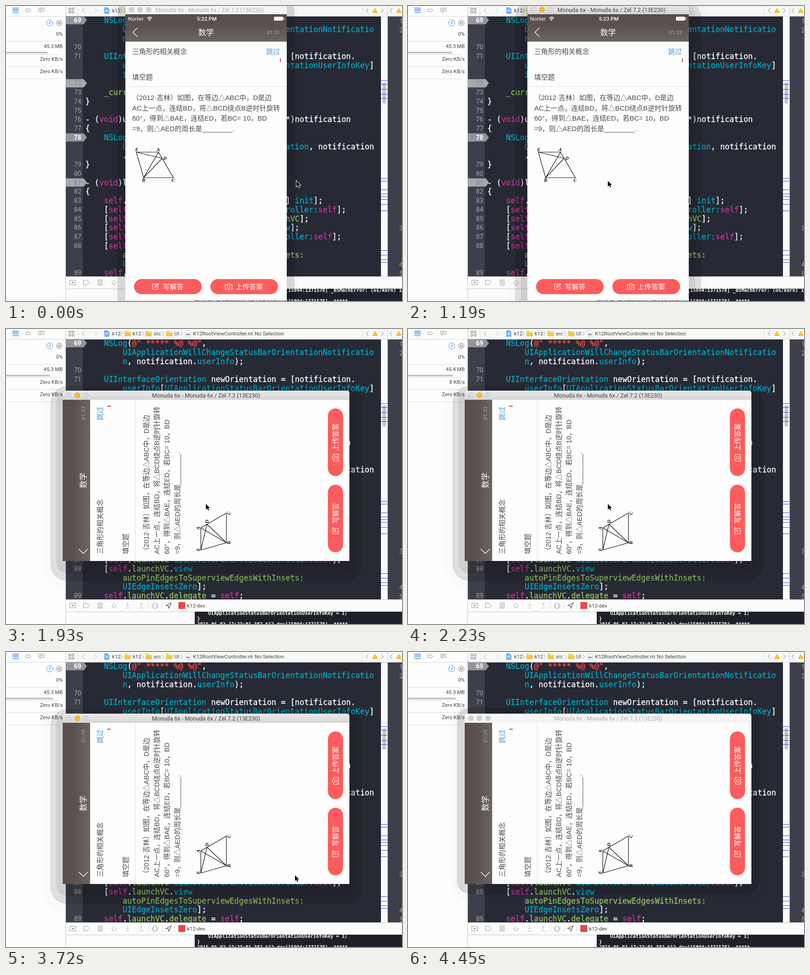
Recreate the animation shown at these times as an HTML page with a canvas. Size 866x646 px, loop 4550 ms.

```html
<!DOCTYPE html>
<html lang="zh-CN">
<head>
<meta charset="utf-8">
<title>Simulator rotation</title>
<style>
html, body { margin: 0; width: 866px; height: 646px; overflow: hidden; background: #fff; }
canvas { display: block; }
</style>
</head>
<body>
<canvas width="866" height="646"></canvas>
<script>
const LOOP = 4550;
const ctx = document.querySelector('canvas').getContext('2d');
const UI = 'Roboto, "Liberation Sans", sans-serif';
const MONO = '"DejaVu Sans Mono", monospace';
const CJK = '"Liberation Sans", "Noto Sans CJK SC", "Noto Sans CJK", sans-serif';
const SERIF = '"Liberation Serif", serif';
const CYAN = '#00a9c4', MAGENTA = '#c8319d', GREEN = '#93c462', RED = '#ff4747';
const BG = '#272a35', GUTTER = '#3d404b', ICON = '#9a9a9a';

// Each schedule lists [start, value]; the last one started is current.
const clock = [[0, '5:22 PM'], [140, '5:23 PM']];
const timer = [[0, '01:31'], [890, '01:32'], [1930, '01:33'], [2830, '01:34'], [3870, '01:35']];
const memory = [[0, '45.3 MB'], [2230, '45.4 MB'], [3120, '45.3 MB']];
const disk = [[0, 'Zero KB/s'], [2080, '8 KB/s'], [3120, 'Zero KB/s']];
const barEnd = [[0, 91], [140, 94], [1190, 96], [2230, 99], [3120, 102], [4170, 104]];
const pointer = [[0, [634, 382]], [140, [408, 398]], [290, [433, 385]], [440, [436, 382]],
  [3720, [631, 488]], [3870, [711, 533]], [4020, null]];
const at = (steps, t) => steps.filter(s => s[0] <= t).pop()[1];

const code = [
  [69, 4, 'NSLog(@" ***** %@ %@",'],
  [0, 8, 'UIApplicationWillChangeStatusBarOrientationNotificatio'],
  [0, 8, 'n, notification.userInfo);'],
  [70, 0, ''],
  [71, 4, 'UIInterfaceOrientation newOrientation = [notification.'],
  [0, 8, 'userInfo[UIApplicationStatusBarOrientationUserInfoKey]'],
  [0, 8, 'integerValue];'],
  [72, 0, ''],
  [73, 4, '_currentOrientation = newOrientation;'],
  [74, 0, '}'],
  [75, 0, ''],
  [76, 0, '- (void)updateOrientations:(NSNotification *)notification'],
  [77, 0, '{'],
  [78, 4, 'NSLog(@" ***** %@ %@",'],
  [0, 8, 'UIDeviceOrientationDidChangeNotification, notification'],
  [0, 8, '.userInfo);'],
  [79, 0, '}'],
  [80, 0, ''],
  [81, 0, '- (void)loadLaunchView'],
  [82, 0, '{'],
  [83, 4, 'self.launchVC = [[K12LaunchScreen alloc] init];'],
  [84, 4, '[self.launchVC willMoveToParentViewController:self];'],
  [85, 4, '[self addChildViewController:self.launchVC];'],
  [86, 4, '[self.view addSubview:self.launchVC.view];'],
  [87, 4, '[self.launchVC didMoveToParentViewController:self];'],
  [88, 4, '[self.launchVC.view'],
  [0, 8, 'autoPinEdgesToSuperviewEdgesWithInsets:'],
  [0, 8, 'UIEdgeInsetsZero];'],
  [89, 4, 'self.launchVC.delegate = self;']
];
const rules = [
  [/^@"/, RED],
  [/^(self|void)$/, MAGENTA],
  [/^(launchVC|delegate|autoPin\w+:|_current\w+)$/, GREEN],
  [/^((UI|NS)\w+|n|userInfo|integerValue|alloc|init|view|addSubview:|\w+ViewController:)$/, CYAN]
];

function text(s, x, y, size, color, align = 'left', face = UI, style = '') {
  ctx.font = `${style} ${size}px ${face}`;
  ctx.textAlign = align;
  ctx.fillStyle = color;
  ctx.fillText(s, x, y + size * (face === CJK ? .38 : .36));
}
function rect(x, y, w, h, color) {
  ctx.fillStyle = color;
  ctx.fillRect(x, y, w, h);
}
function round(x, y, w, h, r, color) {
  ctx.beginPath();
  ctx.roundRect(x, y, w, h, r);
  ctx.fillStyle = color;
  ctx.fill();
}
function fill(d, color) {
  ctx.fillStyle = color;
  ctx.fill(new Path2D(d));
}
function line(d, color, width = 1) {
  ctx.strokeStyle = color;
  ctx.lineWidth = width;
  ctx.stroke(new Path2D(d));
}
function circle(x, y, r, color, edge) {
  ctx.beginPath();
  ctx.arc(x, y, r, 0, 7);
  if (color) { ctx.fillStyle = color; ctx.fill(); }
  if (edge) { ctx.strokeStyle = edge; ctx.lineWidth = 1; ctx.stroke(); }
}

function sidebar(t) {
  rect(0, 0, 130, 646, '#fdfdfd');
  rect(130, 0, 1, 646, '#c4c4c4');
  rect(0, 22, 130, 1, '#d4d4d4');
  line('M14 4.5H28M14 7.5H28M14 10.5H28M14 14.5H28', '#4a90e2', 1.5);
  line('M43.5 6.5H51L54.5 9.5 51 12.5H43.5Z', ICON);
  line('M71.5 4.5H83.5V11.5H77L74.5 14.5V11.5H71.5ZM74 7H81M74 9H79', ICON);
  circle(95.5, 37, 6.5, '', '#4a90e2');
  line('M94 39L98 34', '#4a90e2', 1.5);
  circle(116.5, 37, 6, '', '#777');
  line('M114.8 34V40M118.2 34V40', '#777', 1.5);
  [[61, '0%'], [88, at(memory, t)], [116, at(disk, t)], [143, 'Zero KB/s']]
    .forEach(([y, s]) => text(s, 124, y, 11.2, '#444', 'right'));
  [77, 106, 132, 159].forEach(y => rect(0, y, 117, 1, '#dcdcdc'));
  for (let x = 1; x < at(barEnd, t); x += 2) rect(x, 100, 1, 4, '#8f8f8f');
}

function warning(x) {
  fill(`M${x} 4L${x + 6} 15H${x - 6}Z`, '#f7b500');
  rect(x - .5, 8, 1, 4, '#fff');
  rect(x - .5, 13, 1, 1, '#fff');
}
function chevron(x, y, dx, color, h = 5) {
  line(`M${x + dx} ${y - h}L${x - dx} ${y}L${x + dx} ${y + h}`, color);
}

function jumpBar() {
  rect(131, 0, 735, 23, '#f8f8f8');
  rect(131, 22, 735, 1, '#d0d0d0');
  line('M137.5 4.5H141.5V8.5H137.5ZM144.5 4.5H148.5V8.5H144.5ZM137.5 11.5H141.5V15.5H137.5ZM144.5 11.5H148.5V15.5H144.5Z', '#777');
  chevron(169, 10, 2.5, '#999');
  chevron(196, 10, -2.5, '#bbb');
  rect(157, 0, 1, 22, '#e0e0e0');
  fill('M215 3H222L226 7V17H215Z', '#6fb0ee');
  line('M217.5 13L220.5 7 223.5 13M218 11H223', '#fff');
  [259, 305, 350].forEach(x => {
    fill(`M${x} 4H${x + 5}L${x + 7} 6H${x + 14}V16H${x}Z`, '#f4c64e');
    rect(x, 7, 14, 1, '#fbe09a');
  });
  fill('M392 3H400L404 7V17H392Z', '#fff');
  line('M392.5 3.5H400L403.5 7V16.5H392.5Z', '#c8c8c8');
  text('m', 398, 11, 9, '#7547a5', 'center', SERIF, 'bold');
  [[232, 'k12'], [277, 'k12'], [323, 'src'], [368, 'UI'], [409, 'K12RootViewController.m'], [544, 'No Selection']]
    .forEach(([x, s]) => text(s, x, 10, 11.4, '#444'));
  [253, 299, 344, 384, 539].forEach(x => chevron(x, 10, -1.8, '#999'));
  chevron(790, 10, 2.5, '#777');
  chevron(823, 10, -2.5, '#777');
  chevron(842, 10, 2.5, '#777');
  warning(807);
  warning(859);
  rect(779, 0, 1, 22, '#ddd');
  rect(834, 0, 1, 22, '#ccc');
}

function editor() {
  rect(131, 23, 689, 569, BG);
  rect(131, 23, 37, 569, GUTTER);
  ctx.save();
  ctx.beginPath();
  ctx.rect(131, 22, 689, 570);
  ctx.clip();
  code.forEach(([no, col, src], i) => {
    const y = 31 + i * 19.75;
    const off = no === 72 || no === 81, marked = off || no === 69 || no === 78;
    if (marked) fill(`M131 ${y - 9}H170L177 ${y}L170 ${y + 9}H131Z`, off ? '#a6a8ab' : '#93959b');
    if (no) text(no, 164.5, y, 14, off ? '#82858b' : marked ? '#fff' : '#a0a3aa', 'right', UI, marked && !off ? 'bold' : '');
    let x = 173.5 + col * 10.186;
    for (const tok of src.match(/@"[^"]*"|\w+:?|[^\w@]/g) || []) {
      const rule = rules.find(r => r[0].test(tok));
      const color = rule ? rule[1] : '#fff';
      text(tok, x, y, 16.92, color, 'left', MONO);
      // A hairline outline gives the heavier desktop rendering.
      ctx.strokeStyle = color;
      ctx.lineWidth = .3;
      ctx.strokeText(tok, x, y + 16.92 * .36);
      x += tok.length * 10.186;
    }
  });
  ctx.restore();
  rect(820, 23, 14, 569, '#fbfbfb');
  round(823.5, 167, 7.5, 47, 4, '#c2c2c2');
  [163, 171, 182, 193, 202, 377, 383, 402, 411, 417, 423, 434, 448, 535, 545, 555, 561]
    .forEach(y => rect(820, y, 14, 1, '#4646e0'));
  rect(834, 23, 1, 569, '#c4c4c4');
  rect(835, 23, 31, 569, GUTTER);
  [[33, 1], [53, 2], [487, 3], [566, 4], [586, 5]].forEach(([y, n]) => text(n, 860, y, 14, '#a0a3aa'));
}

function debugArea(t) {
  rect(131, 592, 735, 54, '#fcfcfc');
  rect(131, 592, 735, 1, '#c8c8c8');
  rect(131, 619, 282, 1, '#c8c8c8');
  line('M139.5 600.5H152.5V610.5H139.5Z', ICON);
  fill('M143 604H149L146 608Z', ICON);
  line('M169.5 600.5H178L182.5 605.5 178 610.5H169.5Z', ICON);
  line('M201.5 599.5H204.5V611.5H201.5ZM207.5 599.5H210.5V611.5H207.5Z', ICON);
  line('M230.5 606L236 600.5 241.5 606H238.5V610.5H233.5V606Z', '#b5b5b5');
  line('M266 599V607M263 604L266 607 269 604M261.5 611H270.5', '#b5b5b5');
  line('M295.5 608V600M292.5 603L295.5 600 298.5 603M291 611H300', '#b5b5b5');
  line('M322.5 600.5H329.5V611.5H322.5ZM320 602V610M332 602V610', ICON);
  line('M349.5 605.5L361.5 599.5 356 611.5 355 606Z', '#555', 1.2);
  [311, 341, 368].forEach(x => rect(x, 598, 1, 15, '#d6d6d6'));
  rect(377, 598, 15, 15, '#e8484c');
  text('k12-dev', 396, 605.5, 11.4, '#444');
  rect(412, 619, 1, 27, '#bbb');
  rect(413, 619, 453, 27, '#1f212a');
  const log = (s, x, y) => text(s, x, y, 10.33, '#fff', 'left', MONO, 'bold');
  if (t < 1630) {
    log('2016-06-02 17:22:48.127 k12-dev[15094:1371578] _BSMachError: (os/kern) invalid', 418, 622.5);
  } else {
    log('UIApplicationStatusBarOrientationUserInfoKey = 1;', 442, 622.5);
    log('}', 418, 634.5);
  }
  log('2016-06-02 17:23:01.382 k12-dev[15094:1371578]  *****', 418, 646);
}

// Stepped bands of [spread, drop, opacity].
function shadow(w, active) {
  const bands = active ? [[42, 21, .012], [27, 17, .11], [14, 13, .07]] : [[27, 8, .02], [17, 4, .13]];
  bands.forEach(([s, dy, a]) =>
    round(w.x - s, w.y - s + dy, w.w + 2 * s, w.h + 2 * s, s + 10, `rgba(0,0,0,${a})`));
}

function titleBar(w, active, titled) {
  const g = ctx.createLinearGradient(0, w.y, 0, w.y + 20);
  g.addColorStop(0, active ? '#ebeaeb' : '#f7f7f7');
  g.addColorStop(1, active ? '#d6d5d6' : '#f4f4f4');
  round(w.x, w.y, w.w, 22, [5, 5, 0, 0], g);
  [0, 1, 2].forEach(i => {
    const lit = active && i === 1;
    circle(w.x + 13.5 + i * 18.7, w.y + 10, 5.5, lit ? '#fdb924' : active ? '#dadada' : '#d0d0d0', lit ? '#e3a11c' : '#c6c6c6');
  });
  if (titled) text('Monuda 6x - Monuda 6x / Zel 7.2 (13E230)', w.x + w.w / 2 + 7.5 * (w.w < 400), w.y + 10, 12.5, active ? '#444' : '#adadad', 'center');
}

function wifi(x, y, color) {
  ctx.strokeStyle = color;
  ctx.lineWidth = 1.5;
  [3.2, 6, 8.8].forEach(r => {
    ctx.beginPath();
    ctx.arc(x, y, r - 1, -2.36, -.78);
    ctx.stroke();
  });
  circle(x, y - .5, 1, color);
}

function figure() {
  line('M333.5 320H285L301 376H366L333.5 320L301 376L341.5 333.5L285 320', '#111', 1.2);
  [['E', 286, 314], ['A', 333, 314], ['D', 347.5, 333], ['B', 301, 381.5], ['C', 365.5, 381.5]]
    .forEach(([s, x, y]) => text(s, x, y, 10.5, '#111', 'center', SERIF, 'italic bold'));
  rect(317, 313, 1, 1, '#777');
}

// Screen contents, laid out for the upright phone.
function phone(t, upright) {
  rect(261, 18, 353, 628, '#fdfdfd');
  const g = ctx.createLinearGradient(0, 18, 0, 78);
  g.addColorStop(0, '#574d4c');
  g.addColorStop(.45, '#5c5351');
  g.addColorStop(1, '#6b6562');
  rect(261, 18, 353, 60, g);
  if (upright) {
    text('Norlier', 267, 28, 11.5, '#fff');
    wifi(314, 32, '#fff');
    text(at(clock, t), 439, 28, 11.5, '#fff', 'center', UI, '500');
    round(586, 23.5, 20, 8.5, 2, '#fff');
    rect(607, 26, 1.5, 3.5, '#fff');
  }
  const navY = t >= 1930 ? 63 : 57.5;
  line(`M287.5 ${navY - 10}L277.5 ${navY}L287.5 ${navY + 10}`, '#fff', 1.3);
  text('数学', 437.5, navY, 17, '#fff', 'center', CJK);
  text(at(timer, t), 599.5, navY, 11.8, '#a6a09e', 'right');

  const ink = '#4c4c4c';
  const body = (s, y) => text(s, 276, y, 15, ink, 'left', CJK);
  body('三角形的相关概念', 99);
  text('跳过', 599, 99, 15, '#4f9bd8', 'right', CJK);
  if (t >= 3870 && t < 4450) rect(276, 119, 323, 1, '#ececec');
  rect(599, 115, 2, 8, '#f23c3c');
  body('填空题', 155);
  rect(261, 176, 353, 1, '#dedede');
  body('（2012·吉林）如图，在等边△ABC中，D是边', 200.5);
  body('AC上一点，连结BD，将△BCD绕点B逆时针旋转', 223);
  body('60°，得到△BAE，连结ED，若BC= 10，BD', 245.5);
  body('=9，则△AED的周长是________.', 268);
  figure();

  round(280, 598, 148, 33, 16.5, '#fc5c5c');
  round(447, 598, 148, 33, 16.5, '#fc5c5c');
  text('写解答', 343, 614.5, 15, '#fff', 'left', CJK);
  text('上传答案', 502, 614.5, 15, '#fff', 'left', CJK);
  line('M328 608.5H322Q320.5 608.5 320.5 610V619Q320.5 620.5 322 620.5H331Q332.5 620.5 332.5 619V613M325 616L325.5 613.5 332 607.5 334 609.5 327.5 615.5Z', '#fff', 1.1);
  line('M479.5 610.5H483L484.5 608H489.5L491 610.5H494.5V621H479.5Z', '#fff', 1.1);
  circle(487, 615.3, 3.2, '', '#fff');
}

function simulator(t) {
  const upright = t < 1630, active = t >= 740 && t < 4450;
  const w = upright ? { x: 261, y: -2, w: 353, h: 648 } : { x: 124, y: 135, w: 627, h: 373 };
  shadow(w, active);
  titleBar(w, active, upright || t >= 1780);
  ctx.save();
  if (!upright) {
    ctx.translate(124, 508);
    ctx.rotate(-Math.PI / 2);
    ctx.translate(-261, -18);
  }
  ctx.beginPath();
  ctx.rect(261, 18, 353, 627);
  ctx.clip();
  phone(t, upright);
  ctx.restore();
  // The status bar is still swinging out just after the turn.
  if (!upright && t < 1780) {
    ctx.save();
    ctx.beginPath();
    ctx.rect(124, 155, 60, 353);
    ctx.clip();
    ctx.translate(132, 283);
    ctx.rotate(-.95);
    text('Norlier', 0, 0, 11.5, '#a39c9a', 'right');
    wifi(11, 4, '#b5afad');
    ctx.restore();
  }
}

function cursor(t) {
  const p = at(pointer, t);
  if (!p) return;
  ctx.save();
  ctx.translate(p[0] + 1, p[1] + 1);
  const d = 'M0 0V12.5L3 9.8 5 14.5 7 13.6 5 9H9Z';
  line(d, '#fff', 1.8);
  fill(d, '#000');
  ctx.restore();
}

function draw(now) {
  const t = now % LOOP;
  sidebar(t);
  jumpBar();
  editor();
  debugArea(t);
  simulator(t);
  cursor(t);
  requestAnimationFrame(draw);
}
draw(0);
</script>
</body>
</html>
```
